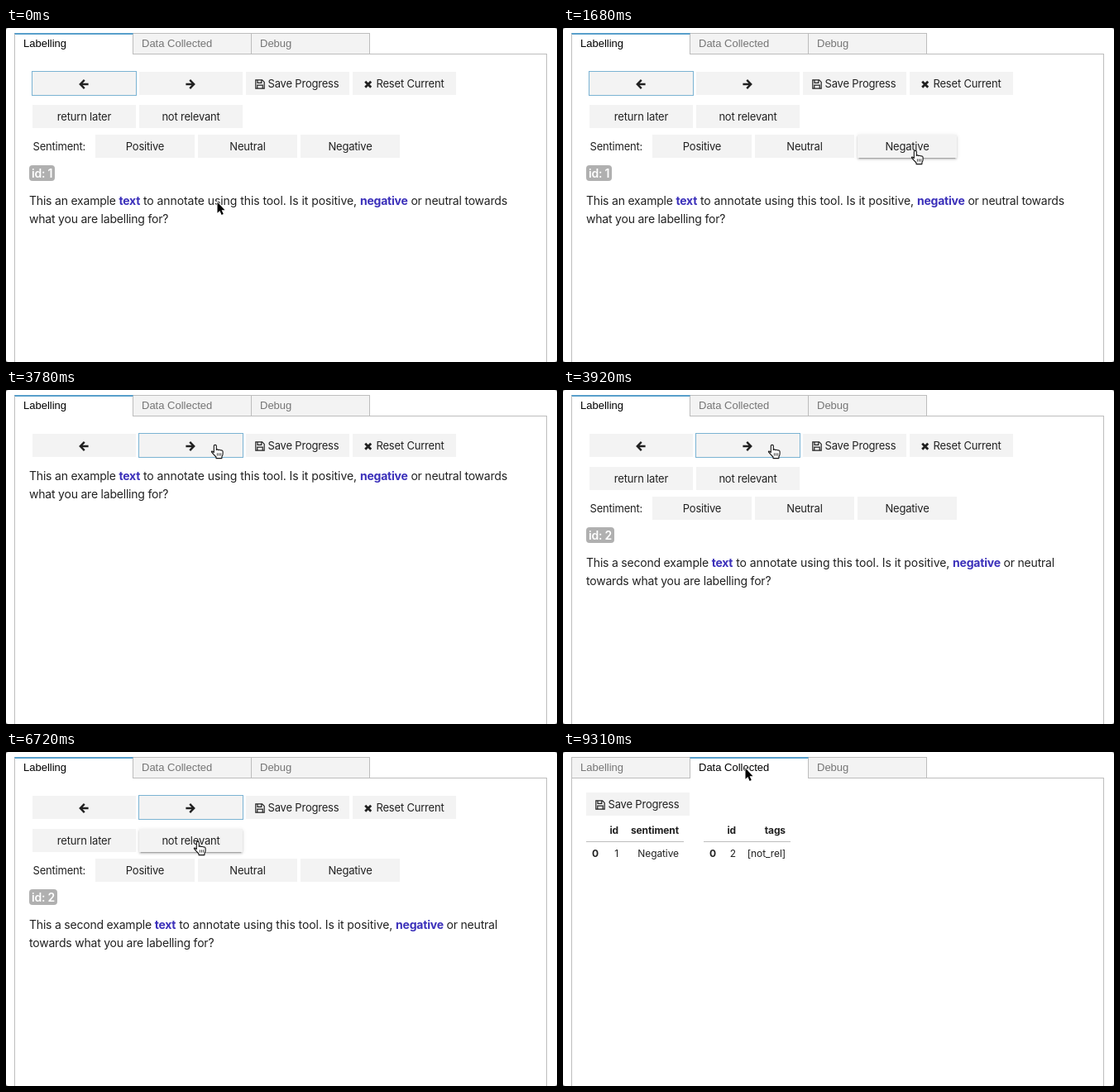
Recreate the animation shown at these times as an HTML page. Size 666x404 px, loop 9.66 s.

```html
<!DOCTYPE html>
<html lang="en">
<head>
<meta charset="utf-8">
<title>Labelling tool</title>
<style>
html, body { margin: 0; width: 100%; height: 100%; overflow: hidden; background: #777; }
#stage { position: relative; width: 666px; height: 404px; overflow: hidden; color: #212121;
  background: #fff; border-radius: 3px;
  font: 13px Inter, sans-serif; letter-spacing: -.2px; white-space: nowrap; }
#stage div, .cursor { position: absolute; box-sizing: border-box; }
#panel { left: 10px; top: 31px; width: 644px; height: 380px; border: 1px solid #bdbdbd; }
#stage .tab { top: 6px; width: 144px; height: 25px; padding-left: 10px; border: 1px solid #bdbdbd;
  border-bottom: 0; background: #f3f3f3; color: #757575; letter-spacing: 0;
  font: 13px/24px "Liberation Sans", Arial, sans-serif; }
#stage .tab.on { height: 26px; border-top: 2px solid #589fcb; line-height: 22px;
  background: #fff; color: #000; z-index: 1; }
.btn { height: 28px; line-height: 28px; text-align: center; background: #f3f3f3; }
.btn svg { vertical-align: -2px; margin: 0 4px 0 -2px; }
.btn .solo { margin: 0 2px 0 0; }
.hover { box-shadow: 0 2px 2px rgba(0,0,0,.14), 0 3px 1px -2px rgba(0,0,0,.2), 0 1px 5px rgba(0,0,0,.12); }
.dark { background: #c4c4c4; }
.raised { box-shadow: 0 4px 5px rgba(0,0,0,.14), 0 1px 10px rgba(0,0,0,.12), 0 2px 4px -1px rgba(0,0,0,.2); }
.focus { outline: 1px solid #7ab3d3; box-shadow: none; }
#badge { left: 28px; top: 166px; height: 19px; padding: 0 3px; border-radius: 4px; background: #b0b0b0;
  color: #fff; font-size: 14px; font-weight: 600; line-height: 19px; letter-spacing: -.2px; }
#text { left: 28px; font-size: 14px; line-height: 22px; letter-spacing: -.21px; }
#text b { color: #3b30ba; }
#text span { letter-spacing: -.07px; }
.cell { font-size: 12px; line-height: 16px; letter-spacing: -.1px; }
.rule { top: 108px; height: 1px; background: #bdbdbd; }
.cursor { left: 0; top: 0; overflow: visible; z-index: 2; }
</style>
</head>
<body>
<div id="stage">
  <div id="panel"></div>
  <div id="label"><div id="tags"><div style="left:32.5px;top:129px;line-height:28px">Sentiment:</div><div id="badge"></div></div><div id="text"></div></div>
  <div id="data"></div>
  <svg class="cursor" id="arrow" width="1" height="1">
    <path d="M.5 .5V13.7L3.4 11 5.6 16 7.8 15.1 5.6 10.2H9.5Z" stroke="#fff" stroke-width="1.6" paint-order="stroke"/>
  </svg>
  <svg class="cursor" id="hand" width="1" height="1" fill="#fff" stroke="#111" stroke-width="1.1" stroke-linejoin="round">
    <path d="M-1.7 9.5V1.8a1.5 1.5 0 0 1 3 0V6.4q1.2-1.1 2.6.2 1.4-.9 2.6.4 2.4-.5 2.6 1.6V11q0 2-1.2 3.6V16.6H1V15Q-1.5 12.5-4.6 8.8q0-2 2.9.7Z"/>
    <path d="M2.4 10.3V13.6M4.5 10.3V13.6M6.6 10.3V13.6" stroke-width=".8"/>
  </svg>
</div>
<script>
const LOOP = 9660, STEP = 70;
const $ = id => document.getElementById(id);

function add(parent, cls, style, html = '') {
  const el = document.createElement('div');
  el.className = cls;
  el.style.cssText = style;
  el.innerHTML = html;
  return parent.appendChild(el);
}

const icon = (d, width, cls = '') =>
  `<svg class="${cls}" width="12" height="12" fill="none" stroke="#212121" stroke-width="${width}"><path d="${d}"/></svg>`;
const back = icon('M6.8.9 1.8 6l5 5.1M2 6H11.6', 2.4, 'solo');
const next = icon('M5.2.9l5 5.1-5 5.1M10 6H.4', 2.4, 'solo');
const disk = icon('M.8.8H8.6L11.2 3.4V11.2H.8ZM3 1V4.4H7.8V1M2.8 11V7.2H9.2V11', 1.2);
const cross = icon('M2.2 2.7 9.2 9.7M9.2 2.7 2.2 9.7', 2.8);

const buttons = [];
function button(parent, x, y, w, html) {
  const el = add(parent, 'btn', `left:${x}px;top:${y}px;width:${w}px`, html);
  const b = { el, x, y, w, parent };
  buttons.push(b);
  return b;
}

const tabs = ['Labelling', 'Data Collected', 'Debug'].map((name, i) =>
  add($('stage'), 'tab', `left:${10 + 143 * i}px`, name));

const label = $('label'), tags = $('tags'), data = $('data');
const [prev, forward] = [back, next, disk + 'Save Progress', cross + 'Reset Current']
  .map((html, i) => button(label, 32 + 129 * i, 53, 125, html));
const [, irrelevant] = ['return later', 'not relevant']
  .map((html, i) => button(tags, 32 + 129 * i, 93, 125, html));
const [, , negative] = ['Positive', 'Neutral', 'Negative']
  .map((html, i) => button(tags, 108 + 124 * i, 129, 120, html));
button(data, 28, 49, 125, disk + 'Save Progress');

function table(left, width, cols) {
  add(data, 'rule', `left:${left}px;width:${width}px`);
  for (const [right, head, value] of cols) {
    const at = `right:${-right}px;top:`;
    add(data, 'cell', at + '87px', `<b>${head}</b>`);
    add(data, 'cell', at + '115px', value);
  }
}
table(28, 118, [[43, '', '<b>0</b>'], [67, 'id', '1'], [140, 'sentiment', 'Negative']]);
table(170, 105, [[185, '', '<b>0</b>'], [209, 'id', '2'], [269, 'tags', '[not_rel]']]);

const middle = '<b>text</b><span> to annotate using this tool. Is it positive, </span><b>negative</b> or neutral';
const texts = [
  `This an example ${middle} towards<br>what you are labelling for?`,
  `This a second example ${middle}<br>towards what you are labelling for?`
];

// Pointer path: time, x, y
const path = [
  [0, 255, 210], [420, 255, 210], [1400, 428, 150], [1680, 426, 148], [2590, 426, 148],
  [3080, 256, 66], [3150, 256, 66], [3640, 253, 66], [4830, 253, 66], [5390, 303, 143],
  [5530, 303, 143], [5600, 303, 144], [6300, 303, 144], [6720, 232, 108], [8050, 232, 108],
  [8260, 214, 28], [8330, 217, 9], [8400, 219, 16], [8470, 219, 16], [8680, 220, 19], [LOOP, 220, 19]
];

function pointer(t) {
  const i = path.findIndex(p => p[0] > t);
  const [t0, x0, y0] = path[i - 1], [t1, x1, y1] = path[i];
  const u = (t - t0) / (t1 - t0), k = u * u * (3 - 2 * u);
  return [x0 + (x1 - x0) * k, y0 + (y1 - y0) * k];
}

let item = -1;
function showItem(i) {
  if (i === item) return;
  item = i;
  $('text').innerHTML = texts[i];
  $('badge').textContent = `id: ${i + 1}`;
}

function render(t) {
  const between = (a, b) => t >= a && t < b;
  const loading = between(3780, 3850), collected = t >= 9030;
  const show = (el, on) => { el.style.display = on ? '' : 'none'; };

  showItem(t < 3850 ? 0 : 1);
  show(label, !collected);
  show(data, collected);
  show(tags, !loading);
  $('text').style.top = loading ? '93px' : '198px';
  tabs.forEach((tab, i) => tab.classList.toggle('on', i === +collected));

  const focus = t < 1820 ? prev : between(3500, 7140) ? forward : t >= 7140 ? irrelevant : null;
  const chosen = between(1820, 3780) ? negative : t >= 7140 ? irrelevant : null;
  const [x, y] = pointer(t);
  let over = false;
  for (const b of buttons) {
    const visible = b.parent === data ? collected : !collected && !(loading && b.parent === tags);
    const hit = visible && x >= b.x && x < b.x + b.w && y >= b.y && y < b.y + 28;
    over = over || hit;
    const c = b.el.classList;
    c.toggle('hover', hit);
    c.toggle('focus', b === focus);
    c.toggle('dark', b === chosen);
    c.toggle('raised', b === chosen && b === negative);
  }

  show($('hand'), over);
  show($('arrow'), !over);
  for (const id of ['hand', 'arrow'])
    $(id).style.transform = `translate(${Math.round(x)}px, ${Math.round(y)}px)`;
}

const start = performance.now();
function tick() {
  const t = (performance.now() - start) % LOOP;
  render(Math.floor(t / STEP) * STEP);
  requestAnimationFrame(tick);
}
tick();
</script>
</body>
</html>
```
